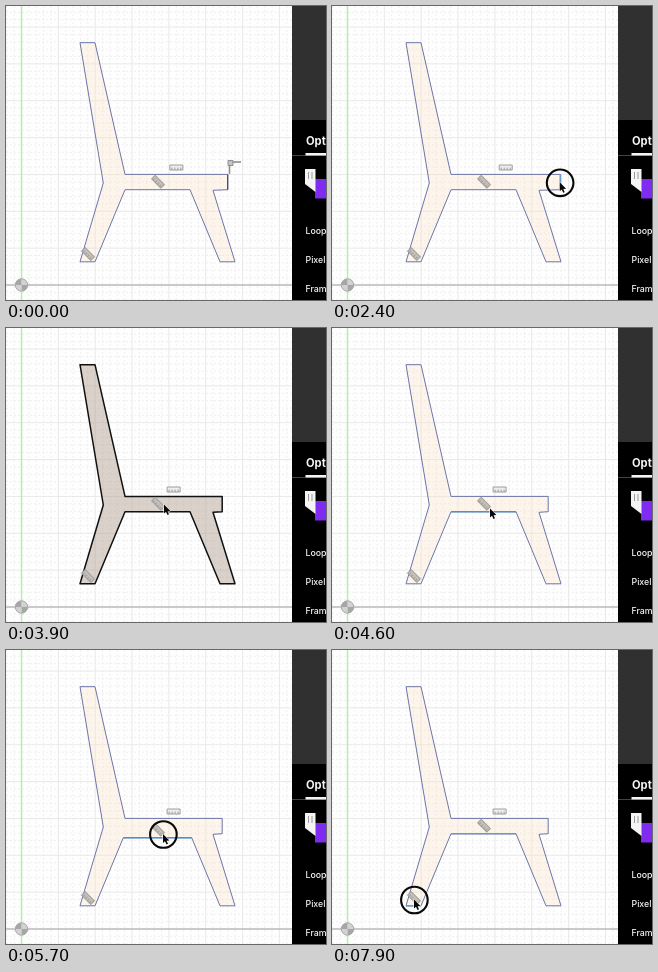
Animation of 320x294 px, one loop 8000 ms. Source, as an HTML page with a canvas:

```html
<!DOCTYPE html>
<html lang="en">
<head>
<meta charset="utf-8">
<style>
  html, body { margin: 0; width: 100%; height: 100%; overflow: hidden; background: #fefefe; }
  canvas { display: block; width: 320px; height: 294px; }
</style>
</head>
<body>
<canvas id="stage" width="320" height="294"></canvas>
<script>
const ctx = document.getElementById('stage').getContext('2d');
const W = 320, H = 294, LOOP = 8000, STEP = 100;
const PANEL_X = 286, PITCH = 36.85, THICK = 15;
const ORIGIN = { x: 15.5, y: 279 };
const SEAT = { left: 119, top: 168.4, right: 221.7, bottom: 183.7 };
const FLOOR = 255.8, LEG_SLOPE = 30 / 72;

const within = (t, from, to) => t >= from && t < to;
const clamp = (v, lo, hi) => Math.min(hi, Math.max(lo, v));
const ease = p => p * p * (3 - 2 * p);

// The pointer rests between its moves; each one eases to a new spot.
const moves = [
  { from: 100, to: 900, x: 221, y: 177 },
  { from: 1600, to: 2000, x: 230, y: 177 },
  { from: 2200, to: 3000, x: 215.5, y: 176 },
  { from: 3400, to: 3900, x: 158, y: 177 },
  { from: 4300, to: 4600, x: 158, y: 181 },
  { from: 4700, to: 5200, x: 158, y: 188 },
  { from: 5400, to: 6000, x: 156, y: 181 },
  { from: 6200, to: 6500, x: 155, y: 193 },
  { from: 6500, to: 7200, x: 82, y: 255 },
  { from: 7700, to: 7900, x: 82, y: 250 }
];

function pointerAt(t) {
  const pos = { x: 268, y: 292 };
  for (const m of moves) {
    const p = ease(clamp((t - m.from) / (m.to - m.from), 0, 1));
    pos.x += (m.x - pos.x) * p;
    pos.y += (m.y - pos.y) * p;
  }
  return pos;
}

// Dragged edges follow the pointer while it is held down.
const seatRight = t => SEAT.right + pointerAt(clamp(t, 1600, 3000)).x - 221;
const seatBottom = t => SEAT.bottom + (pointerAt(clamp(t, 4700, 6000)).y - 181) * 1.15;
const isPressed = t => within(t, 1400, 3400) || within(t, 4700, 6300) || t >= 7700;

function line(x1, y1, x2, y2, color, width = 1) {
  ctx.strokeStyle = color;
  ctx.lineWidth = width;
  ctx.beginPath();
  ctx.moveTo(x1, y1);
  ctx.lineTo(x2, y2);
  ctx.stroke();
}

function polygon(points) {
  ctx.beginPath();
  points.forEach(([x, y]) => ctx.lineTo(x, y));
  ctx.closePath();
}

function drawGrid() {
  const minor = PITCH / 5;
  for (let i = -3; i < 40; i++) {
    const major = i % 5 === 0;
    const x = ORIGIN.x + i * minor, y = ORIGIN.y - i * minor;
    const color = major ? '#e9e9e9' : '#efefef';
    ctx.setLineDash(major ? [] : [2, 2]);
    if (x < PANEL_X) line(x, 0, x, H, color);
    line(0, y, PANEL_X, y, color);
  }
  ctx.setLineDash([]);
}

function drawAxes() {
  const { x, y } = ORIGIN, r = 6.2;
  line(x, 0, x, H, '#b9edaa', 1.5);
  line(0, y, PANEL_X, y, '#a2a2a2', 1.2);
  for (let q = 0; q < 4; q++) {
    ctx.fillStyle = q % 2 ? '#d2d2d2' : '#a6a6a6';
    ctx.beginPath();
    ctx.moveTo(x, y);
    ctx.arc(x, y, r, q * Math.PI / 2, (q + 1) * Math.PI / 2);
    ctx.fill();
  }
  ctx.strokeStyle = '#a8a8a8';
  ctx.lineWidth = 1;
  ctx.beginPath();
  ctx.arc(x, y, r, 0, Math.PI * 2);
  ctx.stroke();
}

function drawChair(right, under, hover) {
  const { left, top, bottom } = SEAT;
  const back = left - THICK * 3, front = 214;
  const spread = (under - bottom) * LEG_SLOPE;
  polygon([
    [back, 36.7], [back + THICK, 36.7], [left, top], [right, top],
    [right, bottom], [207, bottom + 0.6], [front + THICK, FLOOR], [front, FLOOR],
    [184 + spread, under], [left - spread, under],
    [back + THICK, FLOOR], [back, FLOOR], [97.3, 177]
  ]);
  ctx.fillStyle = hover ? 'rgba(168,150,135,0.44)' : 'rgba(250,224,196,0.34)';
  ctx.fill();
  ctx.strokeStyle = hover ? '#111' : '#6c75a8';
  ctx.lineWidth = hover ? 1.5 : 1;
  ctx.lineJoin = 'round';
  ctx.stroke();
}

function drawEdges(t, right, under) {
  const spread = (under - SEAT.bottom) * LEG_SLOPE;
  if (t < 3400) {
    line(right, SEAT.top, right, SEAT.bottom, t < 1100 ? '#444a5c' : '#6a9edb', t < 1100 ? 1.2 : 1.8);
  }
  if (t >= 4500) {
    line(SEAT.left - spread, under, 184 + spread, under, t < 7200 ? '#4f8fcb' : '#7195c2', 1.6);
  }
  if (t >= 7300) line(74, FLOOR, 74 + THICK, FLOOR, '#6b9bd0', 1.5);
}

function drawBar(x, y, angle) {
  ctx.save();
  ctx.translate(x, y);
  ctx.rotate(angle);
  ctx.fillStyle = angle ? '#c3bfba' : '#eee';
  ctx.strokeStyle = '#a19e9b';
  ctx.lineWidth = 1;
  ctx.fillRect(-6.5, -2.5, 13, 5);
  ctx.strokeRect(-6.5, -2.5, 13, 5);
  for (let tick = -4.5; tick < 6; tick += 3) line(tick, 0, tick, 2.5, '#a19e9b');
  ctx.restore();
}

function drawCornerMark() {
  const gray = '#8f8f8f';
  ctx.fillStyle = '#c4c4c4';
  ctx.fillRect(222, 154.5, 5, 5);
  ctx.strokeStyle = gray;
  ctx.lineWidth = 1;
  ctx.strokeRect(222, 154.5, 5, 5);
  line(227, 156, 235, 156, gray, 1.6);
  line(223.5, 159, 223.5, 168, gray, 1.6);
}

function drawPointer(x, y) {
  ctx.save();
  ctx.translate(x, y - 0.5);
  polygon([[0, 0], [0, 9], [2, 7.2], [3.5, 10.5], [5, 9.8], [3.6, 6.7], [6.4, 6.4]]);
  ctx.strokeStyle = '#fff';
  ctx.lineWidth = 1;
  ctx.stroke();
  ctx.fillStyle = '#080808';
  ctx.fill();
  ctx.restore();
}

function drawRing(x, y) {
  ctx.strokeStyle = '#080808';
  ctx.lineWidth = 2.1;
  ctx.beginPath();
  ctx.arc(x + 0.4, y, 13.3, 0, Math.PI * 2);
  ctx.stroke();
}

function drawPanel() {
  const white = '#f4f4f4', left = 299.5;
  ctx.fillStyle = '#000';
  ctx.fillRect(PANEL_X, 0, W - PANEL_X, H);
  ctx.fillStyle = '#303030';
  ctx.fillRect(PANEL_X, 0, W - PANEL_X, 114);
  line(PANEL_X, 149.5, W, 149.5, '#444');
  ctx.fillStyle = '#7f2cf0';
  ctx.fillRect(309, 173, 11, 19.5);
  ctx.fillStyle = white;
  ctx.fillRect(left, 147, W - left, 2.5);
  polygon([[299, 163], [309.5, 163], [309.5, 186], [299, 178]]);
  ctx.fill();
  for (const x of [302.5, 306]) line(x, 166, x, 173, '#999');
  ctx.fillStyle = white;
  ctx.font = '700 11.2px Inter, sans-serif';
  ctx.fillText('Opt', left + 0.5, 139);
  ctx.font = '500 8.8px Inter, sans-serif';
  ['Loop', 'Pixel', 'Fram'].forEach((label, i) => ctx.fillText(label, left, 228 + i * 29));
}

function draw(t) {
  const { x, y } = pointerAt(t);
  const right = seatRight(t), under = seatBottom(t);

  ctx.fillStyle = '#fefefe';
  ctx.fillRect(0, 0, W, H);
  drawGrid();
  drawAxes();
  drawChair(right, under, within(t, 3500, 4500));
  drawEdges(t, right, under);

  drawBar((SEAT.left + right) / 2, 161.5, 0);
  drawBar(152, under - 8, Math.PI / 4);
  drawBar(82, 248, Math.PI / 4);
  if (t < 1700) drawCornerMark();

  drawPanel();
  if (isPressed(t)) drawRing(x, y);
  if (t >= 100) drawPointer(x, y);
}

const start = performance.now();
function tick() {
  const t = (performance.now() - start) % LOOP;
  draw(Math.floor(t / STEP) * STEP);
  requestAnimationFrame(tick);
}
tick();
</script>
</body>
</html>
```
